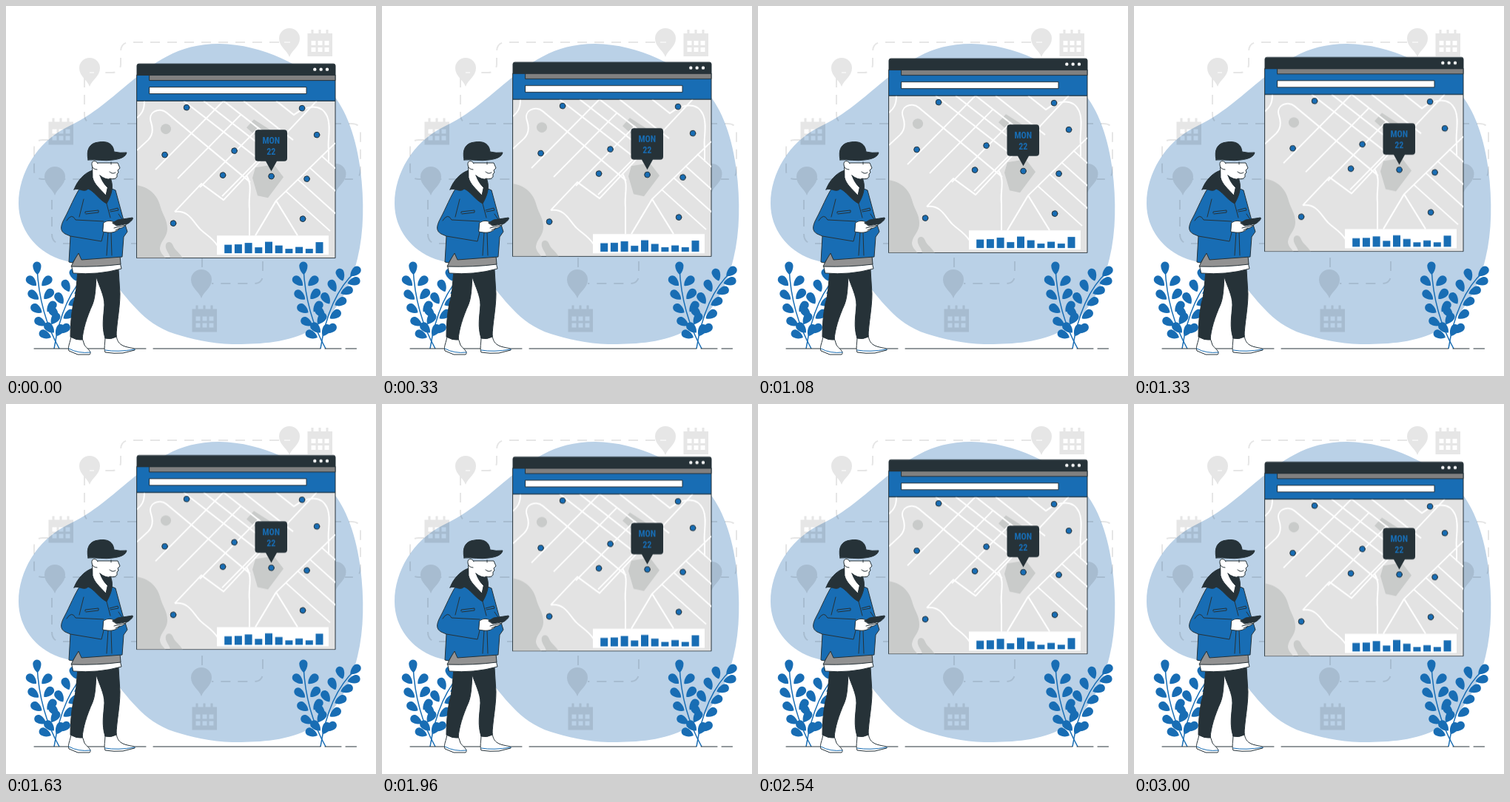
Recreate the animation shown at these times as an HTML page. Size 500 by 500 pixels, loop 3040 ms.

```html
<!DOCTYPE html>
<html lang="en">
<head>
<meta charset="utf-8">
<title>Calendar map</title>
<style>
  html, body { margin: 0; width: 100%; height: 100%; overflow: hidden; background: #fff; }
  svg { display: block; width: 100vw; height: 100vh; }
  .ink { stroke: #263238; stroke-width: 1; stroke-linejoin: round; stroke-linecap: round; }
  .dark { fill: #263238; }
  .blue { fill: #186db4; }
  .white { fill: #fff; }
  .line { fill: none; }
  .route { fill: none; stroke: #000; stroke-width: 2; stroke-dasharray: 13 10; }
  .road { fill: none; stroke: #fff; stroke-width: 2; stroke-linejoin: round; }
  .label { font: 700 12px "Liberation Sans Narrow", "Roboto Condensed", Roboto, sans-serif; font-stretch: 75%; text-anchor: middle; }
  #window { animation: float 3040ms linear -40ms infinite; }
  @keyframes float {
    from, to { transform: translateY(.4px); }
    50% { transform: translateY(-9.6px); }
  }
</style>
</head>
<body>
<svg viewBox="0 0 500 500" xmlns="http://www.w3.org/2000/svg">
  <defs>
    <path id="pin" d="M0 25C-3 16-14 11-14 0A14 14 0 0 1 14 0C14 11 3 16 0 25Z"/>
    <path id="calendar" fill-rule="evenodd" d="M0 5H5V0H8V5H15V0H18V5H25V0H28V5H33.5V36H0ZM5 15V21H11V15ZM14 15V21H20V15ZM23 15V21H29V15ZM5 24V30H11V24ZM14 24V30H20V24ZM23 24V30H29V24Z"/>
    <path id="leaf" d="M-9 0C-6-4 0-6 4-5.500C10-4 10 4 4 5.500C0 6-6 4-9 0Z"/>
    <clipPath id="map"><path d="M177 128H445V340H177Z"/></clipPath>
  </defs>

  <path fill="#bad1e7" d="M17 267C17 226 42 184 82 164C120 146 143 123 168 103C199 78 231 51 288 51C348 52 403 81 438 115C461 140 474 182 479 222C484 262 484 305 475 341C465 382 446 421 406 441C376 456 337 457 306 457C276 456 250 450 228 443C206 436 190 424 176 409C164 397 153 381 142 370C125 354 95 349 72 342C39 330 17 301 17 267Z"/>

  <g opacity=".1">
    <path class="route" d="M369 49H168Q155 49 155 62V78Q155 90 143 90H127"/>
    <path class="route" d="M106 97V146Q106 159 119 159H180"/>
    <path class="route" d="M57 181H50Q38 181 38 193V222Q38 234 50 234H180"/>
    <path class="route" d="M62 262V308Q62 321 75 321H180"/>
    <path class="route" d="M440 159H467Q479 159 479 171V222Q479 234 467 234H458"/>
    <path class="route" d="M265 340V356M347 345V363Q347 375 335 375H278"/>
    <use href="#pin" x="113" y="84"/>
    <use href="#pin" x="383" y="44"/>
    <use href="#pin" x="66" y="231"/>
    <use href="#pin" x="445.5" y="227"/>
    <use href="#pin" x="264" y="370"/>
    <use href="#calendar" x="407.5" y="32"/>
    <use href="#calendar" x="57.5" y="151.5"/>
    <use href="#calendar" x="251.5" y="404.5"/>
  </g>
  <path class="line" stroke="#fff" stroke-opacity=".7" stroke-width="1.5" d="M376 49H384M113 90H119"/>

  <g id="plants" class="blue"></g>
  <path class="ink line" d="M38 463H189M199 463H425M431 463H453M459 463H473.500"/>

  <g id="window">
    <path class="ink" fill="#e3e3e3" d="M177 128H445V340.500H177Z"/>
    <g clip-path="url(#map)">
      <g fill="#c9cbca">
        <path d="M177 242C192 244 205 254 209 272C212 283 218 288 218 301C218 312 209 317 208 327C208 333 213 337 216 341H177Z"/>
        <path d="M216 322C218 317 224 318 226 324C229 331 235 333 239 341H222C222 335 214 329 216 322Z"/>
        <circle cx="216" cy="166" r="7"/>
        <path d="M325 164L335 153L360 169L347 184ZM337 218L362 214L375 231L354 259L340 256L333 232Z"/>
      </g>
      <g id="roads" class="road">
        <path d="M187 128C187 141 183 146 177 151M177 195L192 181C199 174 199 166 196 157C191 143 207 136 217 144L330 238"/>
        <path d="M228 278L264 240L294 262L325 229L420 128M228 278C247 275 253 292 263 302C270 309 278 312 286 324"/>
        <path d="M365 128L389 147C406 134 426 131 434 149C440 163 434 181 436 194V212"/>
        <path d="M325 229C334 243 327 257 329 274V310M337 310L365 263L445 185M365 263L394 310"/>
      </g>
    </g>

    <path class="ink blue" d="M177 93H445V128H177Z"/>
    <path class="ink" fill="#808080" d="M194 93H445V100.500H194Z"/>
    <path class="ink dark" d="M177 93V80.500Q177 78 179.500 78H442.500Q445 78 445 80.500V93Z"/>
    <path class="line" stroke="#fff" stroke-width="4.4" stroke-linecap="round" stroke-dasharray="0 8.350" d="M417.300 85.500H434.100"/>
    <path class="ink white" d="M194 109.500H406V118.500H194Z"/>
    <path class="white" d="M285 310H436V336H285Z"/>
    <g id="bars" class="blue"></g>
    <g id="dots" class="ink blue"></g>
    <path class="dark" d="M340.500 167H376Q380 167 380 171V205.500Q380 209.500 376 209.500H366L358.500 223L351 209.500H340.500Q336.500 209.500 336.500 205.500V171Q336.500 167 340.500 167Z"/>
    <g class="blue label"><text x="358.300" y="186">MON</text><text x="358.300" y="200.500">22</text></g>
  </g>

  <g class="ink">
    <path class="white" d="M88 446C87 455 83 460 85 466L97 471H113C117 467 109 463 106 458L102 446Z"/>
    <path class="white" d="M134 447C134 456 132 462 134 468Q146 470 158 469L174 465C176 462 164 462 158 459C152 456 150 452 149 445Z"/>
    <path class="line" stroke="#186db4" d="M85 463Q98 470 114 468M134 465Q150 468 174 464"/>
    <path class="dark" d="M97 358C95 377 95 390 91 402C88 417 87 433 87 447Q95 452 103 451C104 437 109 421 117 403C121 393 121 379 122 366C126 379 133 391 133 404C132 420 129 433 134 449Q142 451 149 447C149 431 154 409 154 389L152 356Z"/>
    <path class="white" d="M89 351L154 346L156 355Q124 364 91 361Z"/>
    <path fill="#929292" d="M98 332L88 352Q124 353 155 349L154 337Z"/>

    <path class="blue" d="M100 246C93 256 86 274 79 287C73 298 73 304 80 308L87 311L85 346L90 347L98 334L102 343L157 339L159 312L164 305L158 286L148 249L136 244Z"/>
    <path class="dark" d="M92 248C96 237 105 226 117 222L142 235C146 247 141 258 136 267C126 262 119 250 111 247C105 253 99 245 92 248Z"/>
    <path class="white" d="M117 212H151L154 219L151 222L152 225L150 227V231Q147 235 140 233L135 256C127 247 119 241 117 232Z"/>
    <path class="dark" d="M127 229Q134 235 142 234L138 246Q131 240 127 229Z"/>
    <path class="white" d="M124 213C122 208 115 208 116 215Q117 221 123 221"/>
    <path class="line" d="M142 211V214M140 224Q144 228 148 225"/>
    <path class="dark" d="M111 208C108 194 113 185 125 184C137 182 145 186 146 197Q154 199 163 198C162 204 154 207 144 208C134 210 122 207 111 208Z"/>

    <path class="line" d="M136 267L141 286M138 306L136 337M142 306L143 337M107 280V278L125 276V279L108 281M140 276L151 273L152 276L141 278M82 290Q89 279 94 289L132 291M87 311L129 318L132 306M99 285L105 261M152 281L158 290"/>
    <path class="white" d="M132 293C137 289 143 290 148 293L163 294Q162 298 153 301C148 307 139 307 131 305Z"/>
    <path class="dark" d="M144 293L151 289L171 286Q173 288 165 294L150 297Z"/>
    <path class="line" d="M146 300L162 296M148 303L154 300"/>
  </g>
</svg>

<script>
  const NS = 'http://www.w3.org/2000/svg';
  const byId = id => document.getElementById(id);
  const add = (parent, tag, attrs) => {
    const node = document.createElementNS(NS, tag);
    for (const key in attrs) node.setAttribute(key, attrs[key]);
    return parent.appendChild(node);
  };

  // Point and direction on a quadratic curve.
  const along = ([a, b, c], t) => {
    const at = k => (1 - t) ** 2 * a[k] + 2 * t * (1 - t) * b[k] + t * t * c[k];
    const slope = k => (1 - t) * (b[k] - a[k]) + t * (c[k] - b[k]);
    return { x: at(0), y: at(1), angle: Math.atan2(slope(1), slope(0)) };
  };

  function addLeaf(parent, { x, y }, angle, reach) {
    const cx = x + reach * Math.cos(angle), cy = y + reach * Math.sin(angle);
    add(parent, 'use', { href: '#leaf', transform: `translate(${cx} ${cy}) rotate(${angle * 180 / Math.PI})` });
  }

  // A stem from root to tip with a leaf on top and pairs below it.
  function addBranch(parent, stem, lean) {
    const [root, bend, tip] = stem;
    add(parent, 'path', { d: `M${root}Q${bend} ${tip}`, fill: 'none', stroke: '#186db4', 'stroke-width': 1.5 });
    addLeaf(parent, along(stem, 1), along(stem, 1).angle, 0);
    for (let pair = 0; pair < 5; pair++) {
      const joint = along(stem, .77 - pair * .16);
      for (const side of [-1, 1]) addLeaf(parent, joint, joint.angle + side * .82 + lean, 14);
    }
  }

  for (const shift of [0, 360]) {
    const plant = add(byId('plants'), 'g', { transform: `translate(${shift})` });
    addBranch(plant, [[72, 463], [45, 415], [42, 354]], .15);
    addBranch(plant, [[65, 463], [76, 392], [112, 359]], -.15);
  }

  // Two families of parallel side streets.
  let streets = '';
  for (let i = 0; i < 4; i++) {
    streets += `M${202 + i * 30} ${221 + i * 12}l${92 - i * 6} ${-93 + i * 6}`;
    streets += `M${240 + i * 27} 128l${103 - i * 12} ${80 - i * 9}`;
    streets += `M${378 + i * 16} ${250 - i * 16}l60 54`;
  }
  add(byId('roads'), 'path', { d: streets });

  [11.5, 12, 14, 8, 15.5, 10.5, 6, 8.5, 6, 15].forEach((height, i) =>
    add(byId('bars'), 'rect', { x: 295.2 + i * 13.7, y: 334 - height, width: 10, height }));

  const places = [[244, 137], [400, 138], [420, 174], [214.5, 201], [308.5, 195.5],
    [293, 228.5], [358.5, 230], [406.5, 233.5], [226, 293.5], [401, 287.5]];
  for (const [cx, cy] of places) add(byId('dots'), 'circle', { cx, cy, r: 3.8 });
</script>
</body>
</html>
```
